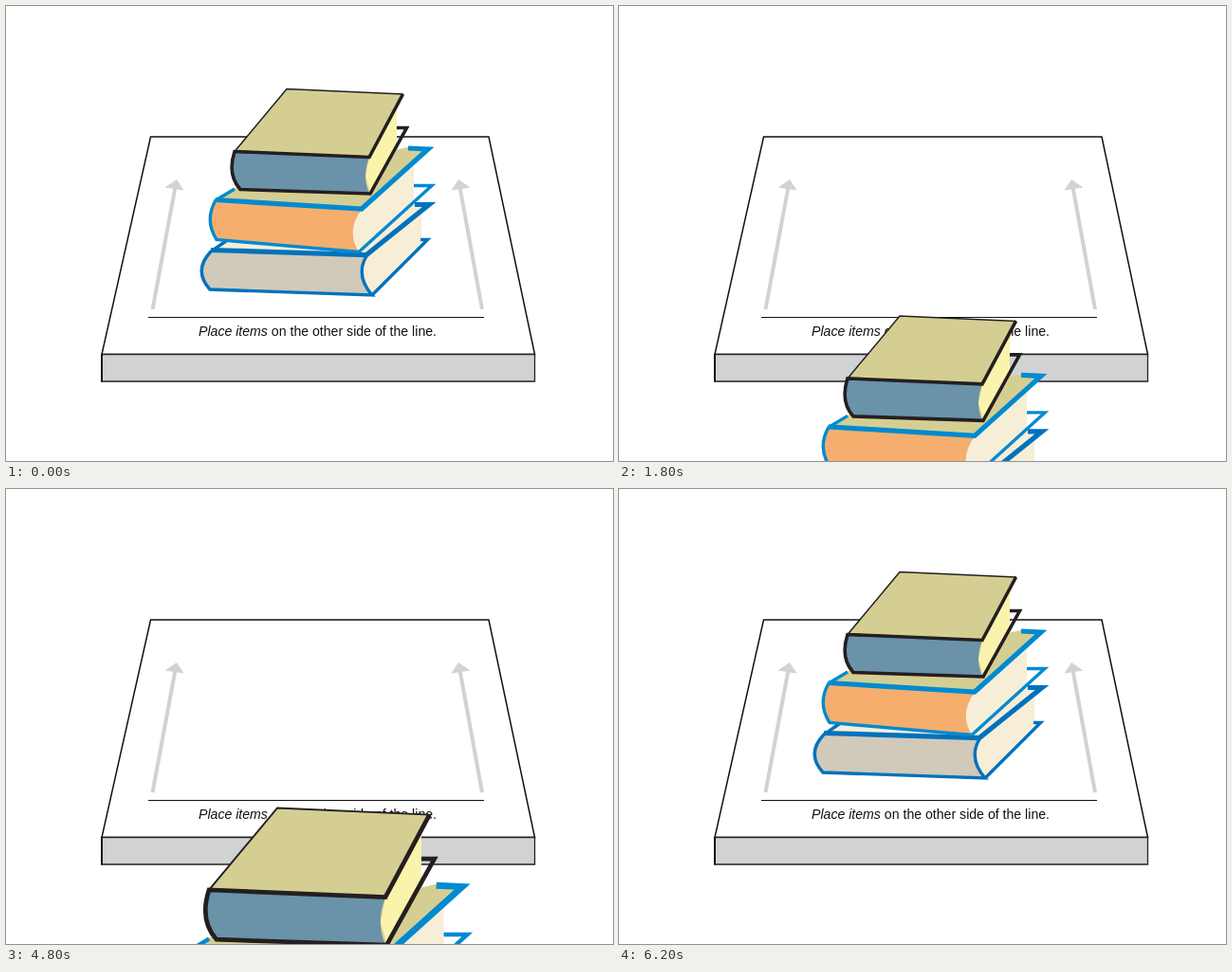
Animation of 640x480 px, one loop 6400 ms. Source, as an HTML page:

```html
<!DOCTYPE html>
<html lang="en">
<head>
<meta charset="utf-8">
<title>Place items on the other side of the line</title>
<style>
  html, body { margin: 0; width: 100%; height: 100%; overflow: hidden; background: #fff; }
  svg { display: block; width: 640px; height: 480px; }
  text { font: 14.12px "Liberation Sans", Arial, sans-serif; fill: #111; }
  .line { fill: none; stroke-linejoin: miter; }
  .thin { stroke-width: 1.5; }
  .thick { stroke-width: 5; }
  .black { stroke: #231f20; stroke-width: 3.6; }
  .sky { stroke: #008ad0; stroke-width: 3.4; }
  .blue { stroke: #0072bd; stroke-width: 3.4; }
  .sky.thick, .blue.thick { stroke-width: 5.2; }
  .black.thin { stroke-width: 1.5; }
  .cream { fill: #f7eed8; }
  .olive { fill: #d5ce93; }
</style>
</head>
<body>
<svg viewBox="0 0 640 480">
  <!-- platform -->
  <path d="M152.5 138H509L557.5 367.5H101Z" fill="#fff" stroke="#111" stroke-width="1.5"/>
  <path d="M101 367.5H557.5V396H101Z" fill="#d1d2d4" stroke="#222" stroke-width="1.3"/>
  <path d="M101 367V396.5" stroke="#111" stroke-width="2"/>
  <path d="M150 328.5H504" stroke="#111" stroke-width="1.2"/>
  <path d="M154.5 320L178.5 191M502 320L478.5 191" stroke="#d1d2d4" stroke-width="4"/>
  <path d="M180 183L167.5 191.5L187.5 194.5ZM477 183L469.5 194.5L489.5 191.5Z" fill="#d1d2d4"/>
  <text x="203" y="348"><tspan font-style="italic">Place items</tspan> on the other side of the line.</text>

  <g id="books">
    <!-- bottom book -->
    <path class="cream" d="M216 258L231 247L438 208H447L438 219V249L386 304L376 284L380 263Z"/>
    <path d="M216 259L380 264Q367 283 385 305L215 299Q197 279 216 259Z" fill="#d1c9b9"/>
    <path class="line blue" d="M380 264Q368 284 386 305L215 299Q197 279 216 259L232 248M386 305L444.5 246.5H437"/>
    <path class="line blue thick" d="M216 257.5L380 262.5L446 209.5H431"/>

    <!-- middle book -->
    <path class="cream" d="M375 214L430 165V206L373 259L366 238Z"/>
    <path class="olive" d="M221 204L241 192L423 149H446L375 214Z"/>
    <path d="M221 205L375 215Q358 237 372 259L221 246Q209 225 221 205Z" fill="#f5ae6e"/>
    <path class="line sky" d="M241 193L221 205Q209 226 222 246.5L372 259.5L449 189.5H430"/>
    <path class="line sky thick" d="M221 204.5L375 214L445 151L424 150"/>

    <!-- top book -->
    <path d="M383 160L412 107V152L384 197L379 180Z" fill="#f9f3ab"/>
    <path class="olive" d="M296 87.5L419 93L383 159L241 153.5Z"/>
    <path d="M241 154L383 160Q375 179 383 198L246 193.500Q232 178 241 154Z" fill="#6a92a9"/>
    <path class="line black thin" d="M241 153.500L296 87.500L419 93"/>
    <path class="line black" d="M418.500 93L383 159.500L241 153.500Q233 178 247 193.500L384 198L422.500 128.500H412"/>
  </g>
</svg>
<script>
const LOOP = 6400, STEP = 200;
const books = document.getElementById("books");

// The stack slides off the bottom, then returns enlarged and settles into place.
function pose(t) {
  const step = Math.floor(t / STEP);
  if (step < 5) return "";
  if (step < 20) return `translate(0 ${19.95 * Math.round(2.4 * (step - 4) + 0.2)})`;
  const left = Math.round((31 - step) * 26 / 11);
  const drop = left * 14.615, scale = 1 + left * 0.0182;
  return `translate(328 ${86 + drop}) scale(${scale}) translate(-328 -86)`;
}

function draw(now) {
  books.setAttribute("transform", pose(now % LOOP));
  requestAnimationFrame(draw);
}
draw(performance.now());
</script>
</body>
</html>
```
